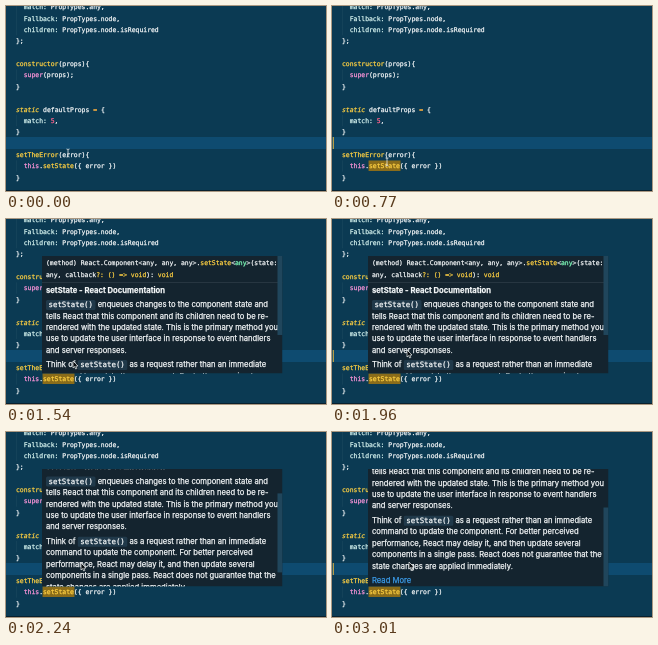
Animation of 320 by 185 pixels, one loop 3.15 s. Source, as an HTML page with a canvas:

```html
<!DOCTYPE html>
<html lang="en">
<head>
<meta charset="utf-8">
<title>Editor hover documentation</title>
<style>
html, body { margin: 0; width: 100%; height: 100%; overflow: hidden; background: #0b3a53; }
canvas { display: block; width: 320px; height: 185px; }
</style>
</head>
<body>
<canvas id="stage"></canvas>
<script>
const W = 320, H = 185, LOOP = 3150, STEP = 70, BLINK = 525;
const canvas = document.getElementById('stage');
const ctx = canvas.getContext('2d');
const ratio = window.devicePixelRatio || 1;
canvas.width = W * ratio;
canvas.height = H * ratio;

const MONO = '"DejaVu Sans Mono", monospace';
const SANS = 'Inter, sans-serif';
const CODE = '6.42px ' + MONO;
const BODY = '7.67px ' + SANS;
const INLINE = '7.4px ' + MONO;

const white = '#f4f7f8', key = '#d5f3ef', yellow = '#ffd042', pink = '#fb94d8',
      orange = '#ffb03d', rose = '#ff628c', teal = '#80ffbb';

const LEFT = 10, TOP = 0.9, ROW = 11.36, CHAR = 3.865;
const POP = { x: 36, y: 37, w: 240.5, h: 117.5 };
const MAX_SCROLL = 57.3;

// Each entry: row, column, then text and colour pairs.
const source = [
  [0, 2, 'match:', key, ' PropTypes.any,', white],
  [1, 2, 'Fallback:', key, ' PropTypes.node,', white],
  [2, 2, 'children:', key, ' PropTypes.node.isRequired', white],
  [3, 0, '};', white],
  [5, 0, 'constructor', yellow, '(props){', white],
  [6, 2, 'super', pink, '(props);', white],
  [7, 0, '}', white],
  [9, 7, 'defaultProps ', white, '=', orange, ' {', white],
  [10, 2, 'match: ', key, '5', rose, ',', white],
  [11, 0, '}', white],
  [13, 0, 'setTheError', yellow, '(error){', white],
  [14, 2, 'this', pink, '.', white, 'setState', yellow, '({ error })', white],
  [15, 0, '}', white]
];

const signature = [
  [44, '(method) React.Component<any, any, any>.', white, 'setState', yellow,
    '<', white, 'any', teal, '>(state:', white],
  [55.5, 'any, callback', white, '?: () => void', yellow, '): ', white, 'void', yellow]
];

// Backticks mark inline code.
const paragraphs = [
  [85.9, [
    '`setState()` enqueues changes to the component state and',
    'tells React that this component and its children need to be re-',
    'rendered with the updated state. This is the primary method you',
    'use to update the user interface in response to event handlers',
    'and server responses.'
  ]],
  [146, [
    'Think of `setState()` as a request rather than an immediate',
    'command to update the component. For better perceived',
    'performance, React may delay it, and then update several',
    'components in a single pass. React does not guarantee that the',
    'state changes are applied immediately.'
  ]]
];

// Keyframes: time, value(s).
const pointerPath = [
  [0, 62, 147], [70, 62, 148], [210, 60, 151], [420, 56, 155], [560, 55, 156],
  [1330, 55, 156], [1400, 59, 152], [1540, 67, 142], [1680, 75, 131],
  [2520, 75, 131], [2800, 77, 130]
];
const scrollPath = [
  [2030, 0], [2100, 7.3], [2170, 22], [2240, 36.3], [2310, 47],
  [2380, 53.5], [2450, 56.3], [2520, MAX_SCROLL]
];

function sample(path, t) {
  const next = path.findIndex(p => p[0] > t);
  if (next === 0) return path[0].slice(1);
  if (next < 0) return path[path.length - 1].slice(1);
  const a = path[next - 1], b = path[next];
  const k = (t - a[0]) / (b[0] - a[0]);
  return a.slice(1).map((v, i) => v + (b[i + 1] - v) * k);
}

function rect(x, y, w, h, color) {
  ctx.fillStyle = color;
  ctx.fillRect(x, y, w, h);
}

// Draws slightly thickened text around a vertical centre and returns the next x.
function write(text, x, y, font, color) {
  ctx.font = font;
  ctx.fillStyle = ctx.strokeStyle = color;
  ctx.lineWidth = 0.25;
  ctx.lineJoin = 'round';
  ctx.fillText(text, x, y + 2.4);
  ctx.strokeText(text, x, y + 2.4);
  return x + ctx.measureText(text).width;
}

function writeRuns(runs, x, y) {
  for (let i = 0; i < runs.length; i += 2) x = write(runs[i], x, y, CODE, runs[i + 1]);
}

function writeProse(line, x, y) {
  line.split('`').forEach((part, i) => {
    if (!part) return;
    if (i % 2 === 0) {
      x = write(part, x, y, BODY, white);
      return;
    }
    ctx.font = INLINE;
    const w = ctx.measureText(part).width;
    ctx.fillStyle = '#20394a';
    ctx.beginPath();
    ctx.roundRect(x, y - 5, w + 5, 10, 1.5);
    ctx.fill();
    write(part, x + 2.5, y, INLINE, white);
    x += w + 5;
  });
}

function drawEditor(marked, caret) {
  rect(0, 0, W, H, '#0b3a53');
  rect(0, 131, W, 12, '#0e4b70');
  if (caret) rect(0.8, 131, 1, 12, '#e0b440');
  for (const [row, count] of [[0, 3], [6, 1], [10, 1], [14, 1]])
    rect(LEFT, TOP + (row - 0.5) * ROW, 0.5, count * ROW, '#1f4a60');
  if (marked) rect(LEFT + 7 * CHAR - 0.5, 154.5, 8 * CHAR + 1, 10.5, '#8a6c1a');
  write('static', LEFT, TOP + 9 * ROW, 'italic ' + CODE, yellow);
  for (const [row, col, ...runs] of source)
    writeRuns(runs, LEFT + col * CHAR, TOP + row * ROW);
  rect(0, H - 1, W, 1, '#08202e');
}

function drawScrollbar(scroll) {
  const { x, y, w, h } = POP, scale = h / (h + MAX_SCROLL);
  rect(x + w - 5, y + scroll * scale, 5, h * scale, '#20465c');
}

function drawPopup(scroll, alpha, hovered) {
  const { x, y, w, h } = POP, left = x + 4;
  ctx.save();
  ctx.globalAlpha = alpha;
  ctx.beginPath();
  ctx.rect(x, y, w, h);
  ctx.clip();
  rect(x, y, w, h, '#14242f');
  ctx.save();
  ctx.translate(0, -scroll);
  for (const [cy, ...runs] of signature) writeRuns(runs, left, cy);
  rect(x, 63, w, 0.6, '#34444e');
  write('setState - React Documentation', left, 71.3, 'bold ' + BODY, white);
  for (const [cy, lines] of paragraphs)
    lines.forEach((line, i) => writeProse(line, left, cy + i * ROW));
  write('Read More', left, 205.8, BODY, '#3b9be8');
  ctx.restore();
  if (hovered) drawScrollbar(scroll);
  ctx.restore();
}

function drawBeam(x, y) {
  ctx.beginPath();
  ctx.moveTo(x - 1.5, y - 4);
  ctx.quadraticCurveTo(x, y - 4, x, y - 3);
  ctx.lineTo(x, y + 3);
  ctx.quadraticCurveTo(x, y + 4, x + 1.5, y + 4);
  ctx.moveTo(x + 1.5, y - 4);
  ctx.quadraticCurveTo(x, y - 4, x, y - 3);
  ctx.moveTo(x, y + 3);
  ctx.quadraticCurveTo(x, y + 4, x - 1.5, y + 4);
  ctx.strokeStyle = '#e4e9ea';
  ctx.lineWidth = 0.8;
  ctx.stroke();
}

function drawArrow(x, y) {
  const shape = [[0, 0], [0, 7], [1.6, 5.6], [2.7, 8], [3.8, 7.5], [2.8, 5.2], [5, 5]];
  ctx.beginPath();
  shape.forEach(([dx, dy]) => ctx.lineTo(x + dx, y + dy));
  ctx.closePath();
  ctx.fillStyle = '#080c0f';
  ctx.fill();
  ctx.strokeStyle = '#eef2f3';
  ctx.lineWidth = 0.7;
  ctx.stroke();
}

function draw(t) {
  const hovered = t >= 1470;
  ctx.setTransform(ratio, 0, 0, ratio, 0, 0);
  drawEditor(t >= 770, Math.floor(t / BLINK) % 2 === 1);
  if (t >= 840) drawPopup(sample(scrollPath, t)[0], t < 910 ? 0.6 : 1, hovered);
  const [px, py] = sample(pointerPath, t);
  (hovered ? drawArrow : drawBeam)(px, py);
}

function frame() {
  const t = performance.now() % LOOP;
  draw(Math.floor(t / STEP) * STEP);
  requestAnimationFrame(frame);
}
frame();
</script>
</body>
</html>
```
